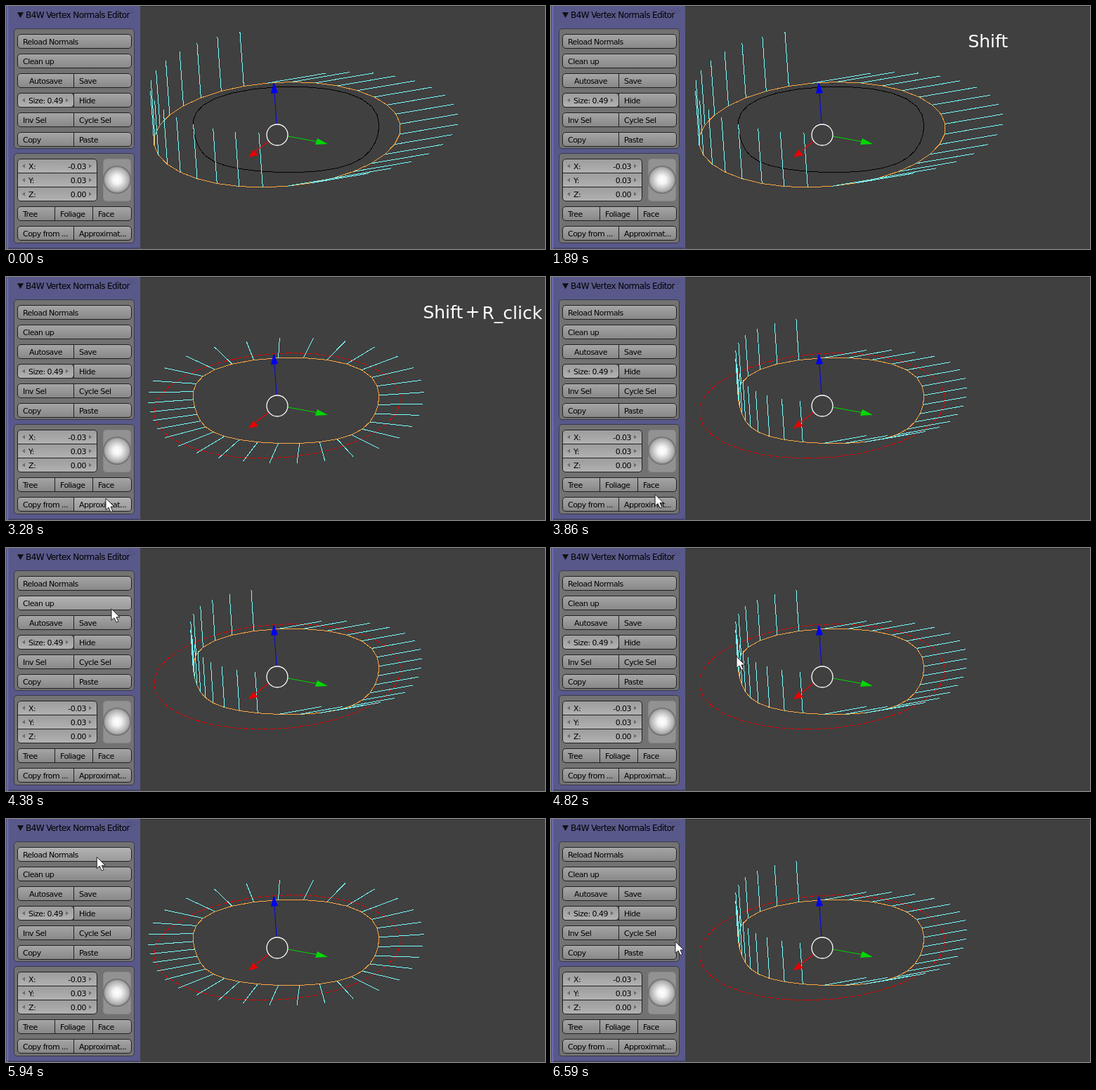
An HTML page that plays this animation: 767x347 px, repeating every 7.49 s.

```html
<!DOCTYPE html>
<html lang="en">
<head>
<meta charset="utf-8">
<style>
  html, body { margin: 0; width: 100%; height: 100%; overflow: hidden; background: #404040; }
  svg { display: block; font: 11px "DejaVu Sans", sans-serif; }
  .crisp { shape-rendering: crispEdges; fill: none; }
  .panel text { letter-spacing: -.05em; }
  .keys { font-size: 25px; fill: #fff; }
</style>
</head>
<body>
<svg width="767" height="347" viewBox="0 0 767 347">
  <defs>
    <linearGradient id="button" x2="0" y2="1"><stop stop-color="#a6a6a6"/><stop offset="1" stop-color="#878787"/></linearGradient>
    <linearGradient id="field" x2="0" y2="1"><stop stop-color="#9c9c9c"/><stop offset="1" stop-color="#b2b2b2"/></linearGradient>
    <linearGradient id="column" href="#field" y2=".333" spreadMethod="repeat"/>
    <radialGradient id="ball"><stop stop-color="#fff"/><stop offset=".3" stop-color="#f4f4f4"/><stop offset=".85" stop-color="#aaa"/><stop offset="1" stop-color="#606060"/></radialGradient>
  </defs>
  <path d="M191 .5H767" stroke="#2e2e2e"/>
  <g class="panel">
    <rect width="191" height="347" fill="#58588a"/>
    <rect x="2" width="1" height="347" fill="#7878d0"/>
    <rect x="3" y="345" width="187" height="2" fill="#444468"/>
    <path d="M168 3l8 8M173 3l8 8M178 3l6 6" stroke="#4a4a78"/>
    <path d="M16 9h9l-4.500 8z" fill="#111"/>
    <text x="28" y="17" font-size="12">B4W Vertex Normals Editor</text>
    <g id="boxes"></g>
    <rect id="hover" rx="3" fill="#fff" opacity=".15"/>
    <g id="labels"></g>
  </g>
  <g class="crisp">
    <path id="outer"/><path id="inner"/><path id="normals" stroke="#78ffff"/>
  </g>
  <g>
    <path d="M374 193L356 207" stroke="#f00000" stroke-width="1.300"/><path d="M345 216L352 205L359 213Z" fill="#e80000"/>
    <path d="M401 186L442 193.500" stroke="#00d800"/><path d="M458 197L443 189L440 198Z" fill="#00d800"/>
    <path d="M385 168L382 124" stroke="#0000f0"/><path d="M381 109L377 125L387 124Z" fill="#0000f0"/>
    <circle cx="386" cy="184" r="15" fill="none" stroke="#fff" stroke-width="1.300"/>
  </g>
  <g class="keys">
    <text id="shift" x="593.400" y="59">Shift</text>
    <text id="plus" x="653.400" y="58">+</text>
    <text id="click" x="677.500" y="60">R_click</text>
  </g>
  <path id="cursor" d="M0 0V16.500L4 13L7 19.500L9.800 18.300L7 12H12Z" fill="#fff" stroke="#222"/>
</svg>
<script>
const $ = id => document.getElementById(id);
const LOOP = 7490;

// Panel
const buttons = [];
let boxes = "", labels = "";

function box(x, y, w, h, fill, stroke = "#202020") {
  boxes += `<rect x="${x + .5}" y="${y + .5}" width="${w}" height="${h}" rx="4.5" fill="${fill}" stroke="${stroke}"/>`;
}
function label(x, y, text, anchor = "start") {
  labels += `<text x="${x}" y="${y}" text-anchor="${anchor}">${text}</text>`;
}
function arrows(left, right, y) {
  labels += `<path d="M${left} ${y}l4 -3v6zM${right} ${y}l-4 -3v6z" fill="#6c6c6c"/>`;
}
function addRow(y, names) {
  box(16, y, 162, 20, "url(#button)");
  const edge = i => 16 + Math.floor(i * 162 / names.length - (i < names.length ? .5 : 0) + .5 * !i);
  names.forEach((name, i) => {
    const x = edge(i), w = edge(i + 1) - x;
    buttons.push({ x, y, w, h: 20 });
    if (i) boxes += `<path d="M${x + .5} ${y}v20" stroke="#202020"/>`;
    if (name.startsWith("Size")) {
      box(x, y, w, 20, "url(#field)");
      arrows(23, 89, y + 10.5);
    }
    if (/Size|Auto/.test(name)) label(x + w / 2 + .5, y + 14.5, name, "middle");
    else label(x + 8, y + 14.5, name);
  });
}

box(11, 32, 171, 171, "#727272", "#38384c");
box(11, 210, 171, 128, "#727272", "#38384c");
[["Reload Normals"], ["Clean up"], ["Autosave", "Save"], ["Size: 0.49", "Hide"], ["Inv Sel", "Cycle Sel"], ["Copy", "Paste"]]
  .forEach((names, i) => addRow(40 + 28 * i, names));
[["Tree", "Foliage", "Face"], ["Copy from ...", "Approximat..."]]
  .forEach((names, i) => addRow(286 + 28 * i, names));

box(16, 218, 113, 60, "url(#column)");
["-0.03", "0.03", "0.00"].forEach((value, i) => {
  const y = 218 + 20 * i;
  buttons.push({ x: 16, y, w: 113, h: 20 });
  if (i) boxes += `<path d="M16 ${y + .5}h113" stroke="#202020"/>`;
  label(32, y + 14.5, "XYZ"[i] + ":");
  label(114, y + 14.5, value, "end");
  arrows(23, 122, y + 10.5);
});
box(138, 218, 39, 60, "#929292", "#868686");
boxes += `<circle cx="158" cy="248" r="20" fill="url(#ball)"/>`;
$("boxes").innerHTML = boxes;
$("labels").innerHTML = labels;

// Rings: vertex 0 lies at the bottom, the order is clockwise
const COUNT = 32;
const wave = turns => Math.cos(turns * 2 * Math.PI / COUNT);
const ring = point => Array.from({ length: COUNT }, (_, k) => point(k));

const outerRing = ring(k => [386 + 175.5 * wave(k + 8.6), 183.7 + 75.2 * wave(k - .05)]);
const innerRing = ring(k => [
  393.3 - 139.9 * wave(k - 7) + 9.4 * wave(3 * (k - 7)) + 9.3 * wave(2 * (k - 4.7)),
  180.3 + 61 * wave(k + .85) + 5 * wave(2 * (k - 8.8))
]);

// The ring plane seen in perspective: one unit spans 64 px across, 28 px in depth, with a slight skew
function fanEnd([x, y], k, points) {
  const [x0, y0] = points[(k + COUNT - 1) % COUNT], [x1, y1] = points[(k + 1) % COUNT];
  const u = (x1 - x0) / 64, v = (y1 - y0 + 3.7 * u) / 28, size = Math.hypot(u, v);
  const nu = v / size, nv = -u / size;
  return [x + 64 * nu, y + 28 * nv - 3.7 * nu];
}
// Left half of the ring points up, right half points sideways
const splitEnd = (up, side) => ([x, y], k) => {
  const [dx, dy] = k < 15 ? up : side;
  return [x + dx, y + dy];
};

const closed = points => "M" + points.join("L") + "Z";
const spikes = (points, end) => points.map((p, k) => `M${p}L${end(p, k, points)}`).join("");
const shapes = {
  outer: spikes(outerRing, splitEnd([-5.5, -78], [82.5, -14])),
  fan: spikes(innerRing, fanEnd),
  split: spikes(innerRing, splitEnd([-3.7, -58.3], [61.5, -11]))
};

function set(id, attrs) {
  for (const name in attrs) $(id).setAttribute(name, attrs[name]);
}
const show = (id, on) => set(id, { visibility: on ? "visible" : "hidden" });
set("outer", { d: closed(outerRing) });
set("inner", { d: closed(innerRing) });

// Pointer stops: time, x, y
const stops = [
  [2980, 290, 215], [3260, 142, 316], [3790, 148, 319], [4400, 150, 86], [4820, 264, 155],
  [5020, 512, 215], [5260, 3, 333], [5900, 129, 54], [6020, 130, 55], [6460, 177, 175]
];
function pointerAt(time) {
  const t = Math.floor((time - 20) / 40) * 40 + 20;
  const next = stops.findIndex(s => s[0] > t);
  if (next < 0) return stops.at(-1).slice(1);
  const a = stops[next - 1], b = stops[next];
  const u = (t - a[0]) / (b[0] - a[0]), eased = u * u * (3 - 2 * u);
  return [1, 2].map(axis => a[axis] + (b[axis] - a[axis]) * eased);
}

function draw(t) {
  const state = t < 2510 ? "outer" : t < 3360 || (t >= 5900 && t < 6590) ? "fan" : "split";
  const outerActive = state === "outer";
  set("normals", { d: shapes[state] });
  set("outer", { stroke: outerActive ? "#ffa540" : "#e60000", "stroke-dasharray": outerActive ? "none" : "7 3" });
  set("inner", { stroke: outerActive ? "#000" : "#ffa540" });

  show("shift", t >= 1890 && t < 3360);
  show("plus", t >= 2190 && t < 3360);
  show("click", t >= 2490 && t < 3360);

  const visible = t >= 3000, [x, y] = pointerAt(Math.max(t, 3000));
  show("cursor", visible);
  set("cursor", { transform: `translate(${x} ${y})` });
  const target = visible && buttons.find(b => x > b.x && x < b.x + b.w && y > b.y && y < b.y + b.h);
  show("hover", target);
  if (target) set("hover", { x: target.x + 1, y: target.y + 1, width: target.w - 1, height: target.h - 1 });
}

const start = performance.now();
function tick() {
  draw((performance.now() - start) % LOOP);
  requestAnimationFrame(tick);
}
tick();
</script>
</body>
</html>
```
